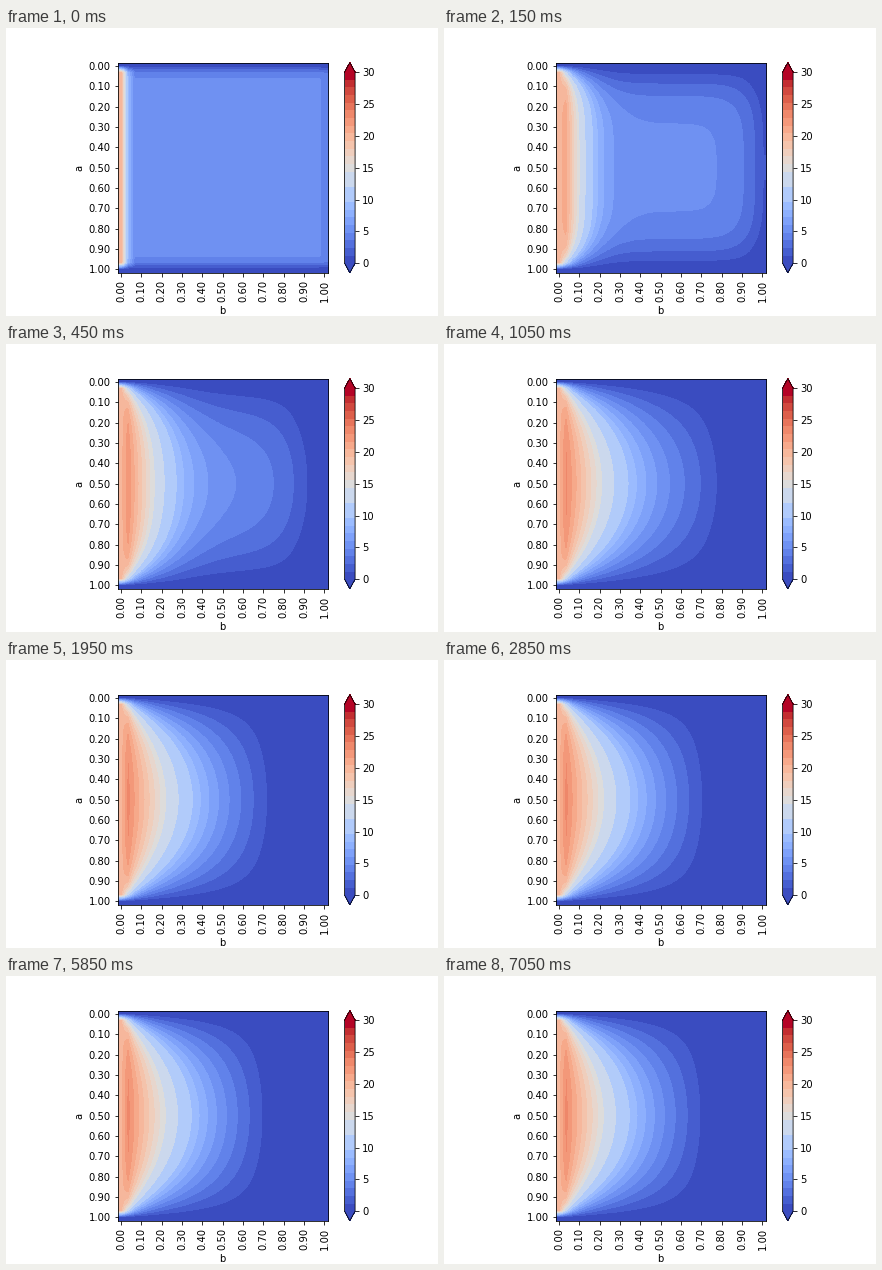
Animation of 432x288 px, one loop 7200 ms. Source, as a matplotlib script:

```python
import matplotlib.pyplot as plt
import numpy as np
from matplotlib.animation import FuncAnimation
from matplotlib.colors import ListedColormap

FRAMES, INTERVAL = 48, 150
CELLS = 31
STEP = 1 / (CELLS - 1)
RATE = 0.2             # diffusion number of one time step
STEPS_PER_FRAME = 41
START, LEFT = 5.0, 20.0
SOURCE = 4.9           # heating next to the left wall
LOSS, OUTSIDE = 2.5, -12.0
VMAX, BANDS = 30, 25

plt.rcParams.update({"font.family": "DejaVu Sans", "font.size": 10})


def hold_walls(u):
    u[:, 0] = LEFT
    u[0] = u[-1] = 0


def advance(u):
    """One explicit heat step; the right wall loses heat to the outside."""
    p = np.pad(u, 1, mode="reflect")
    flow = p[:-2, 1:-1] + p[2:, 1:-1] + p[1:-1, :-2] + p[1:-1, 2:] - 4 * u
    flow[:, 1] += SOURCE
    flow[:, -1] += 2 * STEP * LOSS * (OUTSIDE - u[:, -1])
    u = u + RATE * flow
    hold_walls(u)
    return u


def simulate():
    u = np.full((CELLS, CELLS), START)
    hold_walls(u)
    u = advance(u)
    fields = [u]
    for _ in range(FRAMES - 1):
        for _ in range(STEPS_PER_FRAME):
            u = advance(u)
        fields.append(u)
    return fields


def banded_map():
    colors = plt.get_cmap("coolwarm")(np.linspace(0, 1, BANDS))
    for i in (8, 10):  # neighbouring pale bands share one colour
        colors[i:i + 2] = colors[i:i + 2].mean(axis=0)
    return ListedColormap(colors)


fields = simulate()

fig, ax = plt.subplots(figsize=(6, 4), dpi=72)
fig.subplots_adjust(left=0.125, right=0.9, bottom=0.15, top=0.88)

low, high = -STEP / 2, 1 + STEP / 2
image = ax.imshow(fields[0], cmap=banded_map(), vmin=0, vmax=VMAX,
                  interpolation="bilinear", extent=(low, high, high, low))
ticks = np.linspace(0, 1, 11)
labels = [f"{t:.2f}" for t in ticks]
ax.set_xticks(ticks, labels, rotation=90)
ax.set_yticks(ticks, labels)
ax.set_xlabel("b")
ax.set_ylabel("a")
fig.colorbar(image, ax=ax, extend="both", ticks=range(0, VMAX + 1, 5))


def update(frame):
    image.set_data(fields[frame])
    return [image]


anim = FuncAnimation(fig, update, frames=FRAMES, interval=INTERVAL,
                     repeat=True, repeat_delay=0)
plt.show()
```
